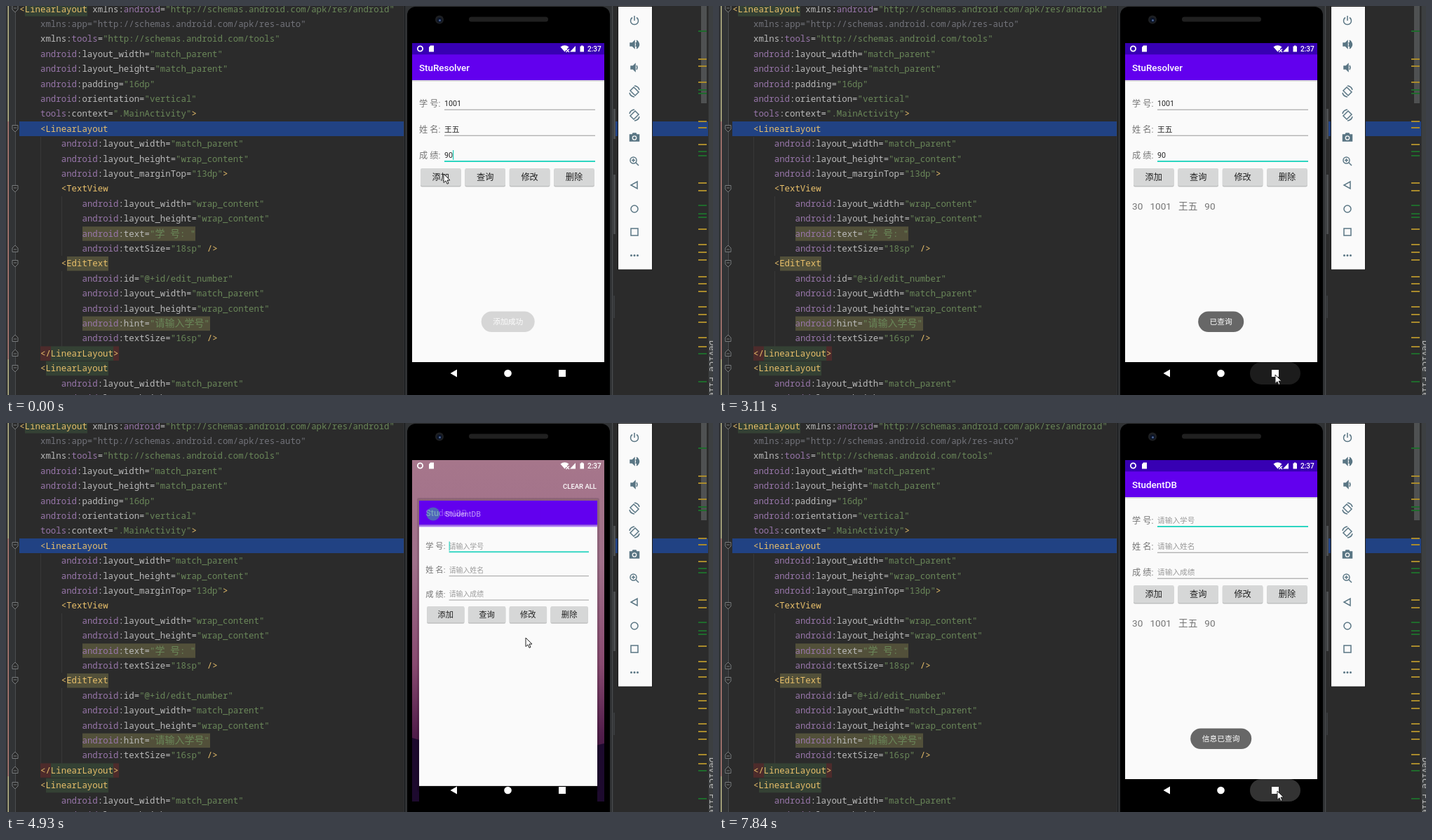
These frames come from a looping animation (1008x556 px, 7.99 s). An HTML page:

```html
<!DOCTYPE html>
<html lang="en">
<head>
<meta charset="utf-8">
<title>Student app demo</title>
<style>
html, body { margin: 0; width: 100%; height: 100%; overflow: hidden; background: #2b2b2b; }
svg { display: block; width: 1008px; height: 556px; }
text { white-space: pre; font-family: Roboto, "Noto Sans CJK SC", "Noto Sans CJK", sans-serif; }
.code text { font: 12.38px "Noto Sans Mono", "Noto Sans CJK SC", "Noto Sans CJK", monospace; }
</style>
</head>
<body>
<svg id="stage" viewBox="0 0 1008 556" xmlns="http://www.w3.org/2000/svg"></svg>
<script>
const LOOP = 7990;
const rect = (x, y, w, h, fill, extra = '') =>
  `<rect x="${x}" y="${y}" width="${w}" height="${h}" fill="${fill}" ${extra}/>`;
const text = (x, y, size, fill, str, extra = '') =>
  `<text x="${x}" y="${y}" font-size="${size}" fill="${fill}" ${extra}>${str}</text>`;
const path = (d, extra = '') => `<path d="${d}" ${extra}/>`;
const circle = (x, y, r, fill, extra = '') => `<circle cx="${x}" cy="${y}" r="${r}" fill="${fill}" ${extra}/>`;
const group = (id, body, extra = '') => `<g id="${id}" ${extra}>${body}</g>`;

// ---------- editor ----------
const CHAR = 7.43, ROW = 21.4;
const rowY = i => 4.2 + i * ROW;
const size = (dim, value) => `android:layout_${dim}="${value}"`;
const matchWidth = size('width', 'match_parent'), wrapWidth = size('width', 'wrap_content');
const wrapHeight = size('height', 'wrap_content');

// [indent, source]
const lines = [
  [0, '<LinearLayout xmlns:android="http://schemas.android.com/apk/res/android"'],
  [1, 'xmlns:app="http://schemas.android.com/apk/res-auto"'],
  [1, 'xmlns:tools="http://schemas.android.com/tools"'],
  [1, matchWidth], [1, size('height', 'match_parent')],
  [1, 'android:padding="16dp"'], [1, 'android:orientation="vertical"'],
  [1, 'tools:context=".MainActivity">'],
  [1, '<LinearLayout'],
  [2, matchWidth], [2, wrapHeight], [2, 'android:layout_marginTop="13dp">'],
  [2, '<TextView'],
  [3, wrapWidth], [3, wrapHeight], [3, 'android:text="学 号: "'], [3, 'android:textSize="18sp" />'],
  [2, '<EditText'],
  [3, 'android:id="@+id/edit_number"'], [3, matchWidth], [3, wrapHeight],
  [3, 'android:hint="请输入学号"'], [3, 'android:textSize="16sp" />'],
  [1, '</LinearLayout>'], [1, '<LinearLayout'],
  [2, matchWidth], [2, wrapHeight]
];

const escape = s => s.replace(/</g, '&lt;').replace(/>/g, '&gt;');
const span = (fill, s) => `<tspan fill="${fill}">${escape(s)}</tspan>`;
const wideChars = s => s.replace(/[\u4e00-\u9fff]+/g, m => `<tspan font-size="14">${m}</tspan>`);

function highlight(src) {
  if (src.startsWith('xmlns:app')) return span('#72737a', src);
  return src.replace(/(<\/?\w+|\/?>)|(\w+)(:\w+)|("[^"]*")|=/g, (m, tag, ns, name, str) => {
    if (tag) return span('#e8bf6a', m);
    if (ns === 'xmlns') return span('#bababa', 'xmlns:') + span('#9876aa', name.slice(1));
    if (ns) return span('#9876aa', ns) + span('#bababa', name);
    return wideChars(span(str ? '#6a8759' : '#bababa', m));
  });
}

function editor() {
  const mark = (x, i, w, fill) => rect(x, rowY(i) - 10, w, 20.5, fill);
  const indentX = n => 19.3 + n * 4 * CHAR;
  let out = rect(0, 0, 1008, 556, '#2b2b2b') + rect(0, 0, 13, 556, '#313335');
  out += rect(2.5, 0, 1.5, 165, '#bdb98a') + rect(2.5, 165, 1.5, 340, '#b87f78') + rect(2.5, 505, 1.5, 51, '#bdb98a');
  out += rect(13, 0, 1, 556, '#4b4d4f');
  out += rect(19, 165, 982, 21, '#214283');
  out += rect(49, 187, 1, 300, '#383838') + rect(79, 272, 1, 85, '#383838') + rect(79, 379, 1, 108, '#383838');
  out += mark(27, 0, 89, '#344134') + mark(109, 15, 161, '#52503a') + mark(87, 17, 59, '#52503a') + mark(109, 21, 182, '#52503a');
  out += mark(49, 23, 15, '#4d2b2b') + mark(64, 23, 89, '#344134') + mark(153, 23, 8, '#4d2b2b') + mark(57, 24, 89, '#344134');
  lines.forEach(([n, src], i) => {
    out += text(indentX(n), rowY(i) + 4.4, 12.38, '#bababa', highlight(src));
  });
  const fold = (y, flip) => path(`M-4-4.500H4V1L0 5-4 1ZM-2-1H2`,
    `transform="translate(13 ${y}) scale(1 ${flip})" fill="#2b2b2b" stroke="#777a7c"`);
  [4, 175, 261, 368, 518].forEach(y => out += fold(y, 1));
  [347, 475, 496].forEach(y => out += fold(y, -1));
  // right-hand error stripe
  out += rect(991, 0, 8, 139, '#4f5152');
  const gold = [76, 86, 109, 165, 174, 198, 253, 264, 319, 341, 352, 363, 387, 397, 408, 430, 441, 452, 474, 487];
  const green = [36, 120, 125, 208, 214, 285, 297, 302, 497, 537];
  gold.forEach(y => out += rect(987, y - 1, 12, 2, '#a98a2c'));
  green.forEach(y => out += rect(987, y - 1, 12, 2, '#1f6b2c'));
  out += rect(1001, 0, 7, 556, '#3c3f41') + rect(1001, 0, 1, 556, '#323232');
  out += text(0, 0, 11, '#bbb', 'Device File', 'transform="translate(1003 478) rotate(90)"');
  return group('editor', out, 'class="code"');
}

// ---------- emulator ----------
function toolbar() {
  const icons = [
    [21, 'M-3-4.500A5.500 5.500 0 1 0 3-4.500M0-7V0'],
    [55, 'M-6-2H-3L0-5V5L-3 2H-6ZM2-3Q4 0 2 3M3-6Q10 0 3 6'],
    [88, 'M-5-2H-2L1-5V5L-2 2H-5ZM3-3Q5 0 3 3'],
    [122, 'M-1-6L6 1 1 6-6-1ZM-7 2Q-6 7 0 8M7-2Q6-7 0-8'],
    [156, 'M1-6L-6 1-1 6 6-1ZM7 2Q6 7 0 8M-7-2Q-6-7 0-8'],
    [188, 'M-6.500-4H-3L-2-6H2L3-4H6.500V5H-6.500Z'],
    [222, 'M2 2L6 6M3-1.500A4.500 4.500 0 1 1-6-1.500A4.500 4.500 0 1 1 3-1.500M-4-1.500H1M-1.500-4V1'],
    [256, 'M4-5V5L-5 0Z'],
    [290, 'M5 0A5 5 0 1 1-5 0A5 5 0 1 1 5 0'],
    [323, 'M-5-5H5V5H-5Z']
  ];
  const slate = '#5a7684', filled = [55, 88, 188];
  let out = rect(872.5, .5, 49, 376.5, '#fafafa', 'stroke="#1b1b1b"');
  icons.forEach(([y, d]) => out += path(d, `transform="translate(896 ${y})" stroke="${slate}" stroke-width="1.5" fill="${filled.includes(y) ? slate : 'none'}"`));
  out += circle(896, 188.5, 2.7, slate, 'stroke="#fafafa" stroke-width="1.3"');
  [-4.5, 0, 4.5].forEach(dx => out += circle(896 + dx, 356.5, 1.5, slate));
  return out;
}

function phoneBody() {
  return rect(866, 147, 3, 43, '#4b4d4f') + rect(866, 241, 3, 85, '#4b4d4f') + rect(866, 414, 2, 32, '#3a3c3e') +
    rect(567, -20, 299, 620, '#303234') + rect(568, -20, 1, 620, '#16181a') + rect(864, -20, 1, 620, '#4a4c4e') +
    rect(572, 1, 289, 620, '#000', 'rx="12"') +
    circle(618, 19.5, 6, '#1d1f22') + circle(618, 20, 3.6, '#0b1428') + circle(618.5, 20.5, 1.5, '#4a6393') +
    rect(660, 15.5, 113, 7, '#202020', 'rx="3.500"');
}

function statusIcons() {
  return circle(590.5, 61, 3.6, 'none', 'stroke="#fff" stroke-width="1.800"') +
    path('M603 59L605 56.500H610V65.500H603Z', 'fill="#fff"') +
    path('M790.500 58.500Q796.500 54 802.500 58.500L796.500 65.500Z', 'fill="#fff"') +
    path('M798.500 61.500L803 66M803 61.500L798.500 66', 'stroke="#fff" stroke-width="1.200"') +
    path('M804 65.500L812 57V65.500Z', 'fill="#fff"') +
    path('M818.500 57.500H820V56.500H822.500V57.500H824V65.500H818.500Z', 'fill="#fff"') +
    text(829, 65, 10, '#fff', '2:37', 'font-weight="500"');
}

const fields = [['学 号:', 148], ['姓 名:', 185], ['成 绩:', 222]];

function appWindow(id, title, values, hints, focus) {
  let out = rect(579, 106, 274, 403, '#fafafa') + rect(579, 509, 274, 34, '#000');
  out += rect(579, 106, 274, 2, '#000', 'opacity=".120"') + rect(579, 69, 274, 37, '#6200ee');
  out += group(id + 'Status', rect(579, 53, 274, 16.3, '#3700b3'));
  out += text(589, 92.5, 13.4, '#fff', title, `font-weight="500" id="${id}Title"`);
  fields.forEach(([label, y], i) => {
    out += text(589, y - 4.5, 12.2, '#757575', label);
    out += text(625, y - 4.7, 10.7, hints ? '#9a9a9a' : '#222', values[i]);
    out += i === focus ? rect(625, y - 1, 215, 2, '#2cd5c1') : rect(625, y - .3, 215, 1, '#989898');
  });
  out += rect(hints ? 625 : 637, fields[focus][1] - 16, 1.2, 14, '#1fcdb8', `id="${id}Caret"`);
  ['添加', '查询', '修改', '删除'].forEach((label, i) => {
    const x = 591 + i * 63.4;
    out += rect(x, 233, 57.6, 25.5, '#bfc0c0', 'rx="2"') + rect(x, 232, 57.6, 25, '#d6d7d7', 'rx="2"');
    out += text(x + 28.8, 248.7, 12.2, '#212121', label, 'text-anchor="middle"');
  });
  out += text(589, 291.3, 13.6, '#757575', '30   1001   王五   90', `id="${id}Result"`);
  const header = rect(589, 111, 254, 37.5, id === 'resolver' ? '#5200c8' : '#6200ee') +
    circle(609, 130, 9.5, '#3bc884') +
    text(626, 134, 10.7, id === 'resolver' ? '#c9b3ea' : '#fff', title, 'font-weight="500"');
  const shadow = rect(586, 107, 260, 420, '#000', 'opacity=".130" rx="3"');
  return group(id, group(id + 'Shadow', shadow) + group(id + 'Body', out) + group(id + 'Header', header));
}

function wallpaper() {
  return rect(579, 53, 274, 488, 'url(#dusk)') +
    path('M579 450L716 490 853 458V541H579Z', 'fill="#1d0a2e"') +
    text(842, 93.5, 9.5, '#fff', 'CLEAR ALL', 'font-weight="500" text-anchor="end"');
}

const toast = (id, label, w) => group(id,
  rect(715.7 - w / 2, 436.5, w, 29.5, '#616161', 'rx="14.700" opacity=".960"') +
  text(715.7, 455.3, 10.75, '#fff', label, 'text-anchor="middle"'));

const navIcons = path('M643 519.500V530.500L633.500 525Z', 'fill="#fff"') + circle(715.5, 525, 5.3, '#fff') +
  rect(788, 520, 10, 10, '#fff');

const stage = document.getElementById('stage');
stage.innerHTML = `<defs>
  <linearGradient id="dusk" x1="0" y1="0" x2="0" y2="1">
    <stop offset="0" stop-color="#a6768b"/><stop offset=".3" stop-color="#a0708a"/>
    <stop offset=".6" stop-color="#884a70"/><stop offset=".8" stop-color="#521e4b"/><stop offset="1" stop-color="#260d33"/>
  </linearGradient>
  <clipPath id="screen"><rect x="579" y="53" width="274" height="488"/></clipPath></defs>` +
  editor() + phoneBody() + toolbar() +
  group('display',
    group('wall', wallpaper()) +
    appWindow('student', 'StudentDB', ['请输入学号', '请输入姓名', '请输入成绩'], true, 0) +
    appWindow('resolver', 'StuResolver', ['1001', '王五', '90'], false, 2) +
    rect(757, 509, 72, 32, '#fff', 'rx="16" id="ripple"') + navIcons + statusIcons() +
    toast('added', '添加成功', 76) + toast('queried', '已查询', 65) + toast('found', '信息已查询', 87),
    'clip-path="url(#screen)"') +
  group('pointer', path('M0 0V12.500L3 9.800 5 14.300 7 13.400 5 9H9Z', 'fill="#fff" stroke="#222" stroke-width="1"'));

// ---------- motion ----------
const el = {};
stage.querySelectorAll('[id]').forEach(node => el[node.id] = node);
const mix = (a, b, k) => a + (b - a) * k;
const show = (id, opacity) => el[id].setAttribute('opacity', opacity);

function track(keys, t, column = 1) {
  const next = keys.findIndex(k => k[0] > t);
  if (next < 0) return keys[keys.length - 1][column];
  if (next === 0) return keys[0][column];
  const a = keys[next - 1], b = keys[next];
  return mix(a[column], b[column], (t - a[0]) / (b[0] - a[0]));
}

const bursts = [[0, 0, 1], [120, 1080, 8], [1230, 2140, 7], [2290, 3230, 7], [3390, 3390, 1], [3660, 4500, 7],
  [4780, 5770, 8], [5890, 5890, 1], [6200, 6620, 4], [6900, 7840, 7]];
function recorded(t) {
  const [first, last, count] = bursts.filter(b => b[0] <= t).pop();
  if (count === 1) return first;
  const step = (last - first) / (count - 1);
  return first + step * Math.min(count - 1, Math.floor((t - first) / step + .2));
}

const pointerPath = [[0, 624, 240], [520, 624, 240], [940, 680, 241], [1080, 685, 241], [1530, 685, 241],
  [1685, 703, 325], [1837, 737, 430], [1988, 757, 489], [2140, 777, 513], [2290, 790, 523], [2446, 793, 527],
  [3390, 793, 527], [3660, 794, 516], [3800, 794, 516], [4500, 741, 307], [4930, 741, 307], [5345, 725, 274],
  [5770, 684, 240], [5890, 685, 240], [6620, 685, 240], [6900, 694, 270], [7530, 784, 500], [7683, 796, 526]];
const addedFade = [[0, .24], [120, .5], [400, 1], [1837, 1], [1988, .88], [2140, .45], [2290, 0]];
const queriedFade = [[2140, 0], [2290, .3], [2446, 1], [4080, 1], [4360, 0]];
const foundFade = [[6200, 0], [6340, .45], [6480, 1]];
const rippleFade = [[2600, 0], [2760, .2], [2917, .2], [3073, .11], [3230, 0], [7530, 0], [7683, .15], [7840, .2]];
const resolverShrink = [[3600, 0], [3660, .5], [3780, 1]];
const resolverDrop = [[4700, 0], [4780, 60], [4920, 140]];
const studentGrow = [[4921, 0], [5063, .5], [5204, 1]];
const headerFade = [[4780, 1], [4921, .5], [5063, .1], [5204, 0]];

// full = 1 fills the screen, full = 0 is a card in the overview
function placeWindow(id, full, cardY, header) {
  const scale = mix(.927, 1, full);
  const x = mix(589 - 579 * .927, 0, full), y = mix(47.1 + cardY, 0, full);
  el[id + 'Body'].setAttribute('transform', `translate(${x} ${y}) scale(${scale})`);
  el[id + 'Header'].setAttribute('transform', `translate(0 ${mix(cardY, -42, full)})`);
  el[id + 'Shadow'].setAttribute('transform', `translate(0 ${cardY})`);
  show(id + 'Header', header);
  show(id + 'Title', 1 - header);
  show(id + 'Shadow', 1 - full);
  show(id + 'Status', full > .4 ? full : 0);
}

function draw(now) {
  const t = now % LOOP, r = recorded(t);
  const shrink = track(resolverShrink, r), grow = track(studentGrow, r);
  const inOverview = r >= 3660;

  show('wall', inOverview ? 1 : 0);
  show('student', inOverview ? shrink : 0);
  show('resolver', r < 4900 ? 1 : 0);
  placeWindow('student', grow, mix(-60, 0, shrink), track(headerFade, r));
  placeWindow('resolver', 1 - shrink, 323 + track(resolverDrop, r), shrink);

  show('resolverResult', r >= 1380 ? 1 : 0);
  show('studentResult', r >= 6330 ? 1 : 0);
  show('resolverCaret', !inOverview && (t + 980) % 1000 >= 500 ? 1 : 0);
  show('studentCaret', r < 5200 || (t % 1000 >= 200 && t % 1000 < 700) ? 1 : 0);

  show('added', track(addedFade, r));
  show('queried', track(queriedFade, r));
  show('found', track(foundFade, r));
  show('ripple', track(rippleFade, r));
  el.pointer.setAttribute('transform', `translate(${track(pointerPath, r)} ${track(pointerPath, r, 2)})`);
}

const start = performance.now();
function frame() {
  draw(performance.now() - start);
  requestAnimationFrame(frame);
}
frame();
</script>
</body>
</html>
```
